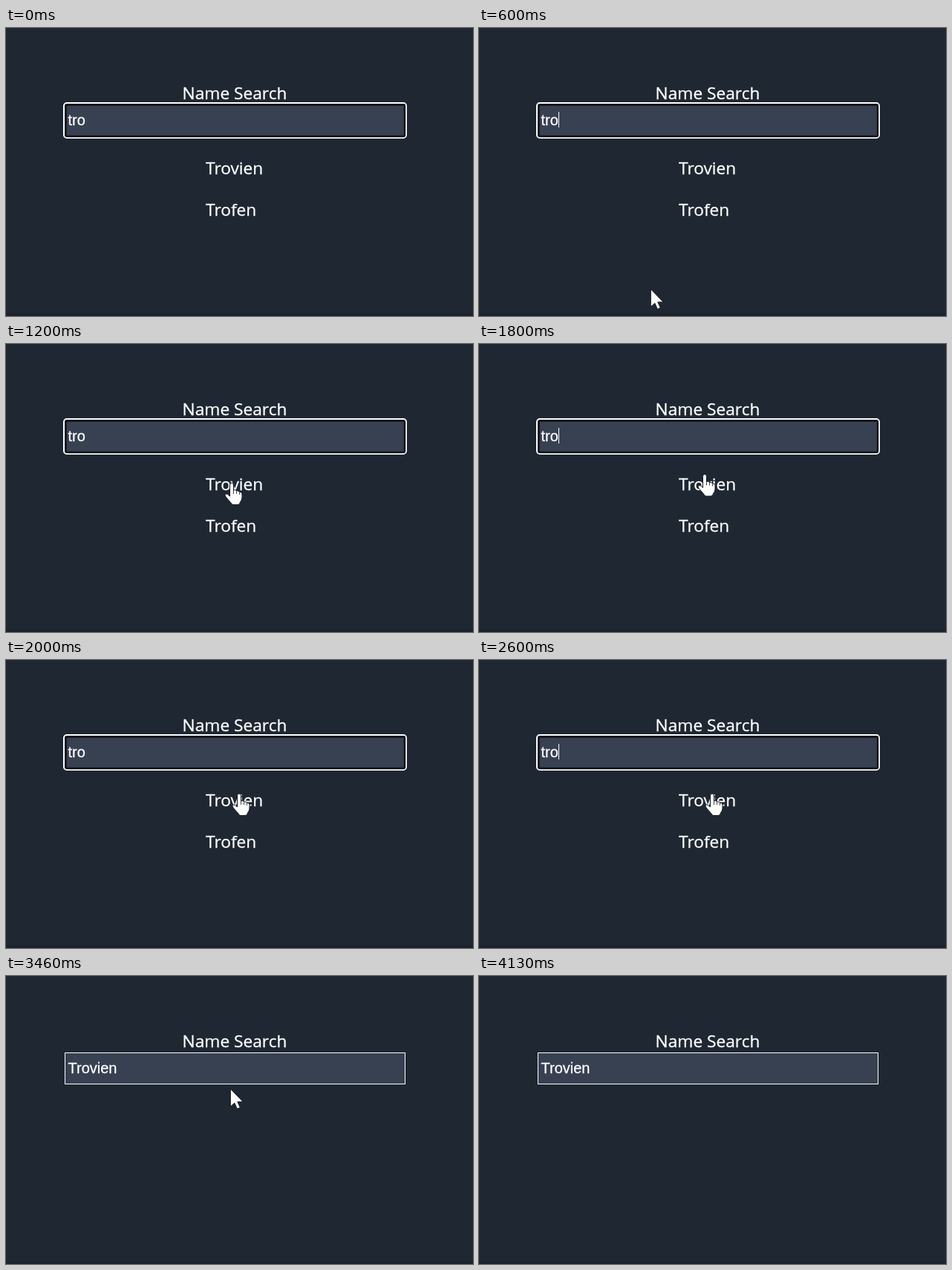
Write an HTML page that moves like this. It is 629 px wide and 388 px high and loops after 4.27 s.

```html
<!DOCTYPE html>
<html lang="en">
<head>
<meta charset="utf-8">
<title>Name Search</title>
<style>
  html, body { margin: 0; width: 100%; height: 100%; overflow: hidden; background: #1f2832; }
  svg { display: block; width: 629px; height: 388px; }
  text { font: 22.7px "Open Sans", "Noto Sans", sans-serif; fill: #fff; stroke: #fff; stroke-width: .3; }
  .typed { font: 20px "Liberation Sans", Arial, sans-serif; }
  .pointer { fill: #fff; stroke: #11161c; stroke-linejoin: round; }
</style>
</head>
<body>
<svg viewBox="0 0 629 388">
  <rect y="384" width="629" height="4" fill="#1b242d"/>
  <text x="237.6" y="96.4">Name Search</text>

  <g id="open">
    <rect x="78" y="101" width="461" height="47" rx="4" fill="#11161c" stroke="#fff" stroke-width="2"/>
    <rect x="80.5" y="103.5" width="456.5" height="42.5" rx="2" fill="#384152" stroke="#0d1116" stroke-width="2.5"/>
    <text class="typed" x="83.5" y="130.5">tro</text>
    <rect id="caret" x="107" y="113" width="1" height="21" fill="#fff"/>
    <text x="269" y="196.5">Trovien</text>
    <text x="269" y="252.5">Trofen</text>
  </g>

  <g id="chosen">
    <rect x="79.5" y="103.5" width="458" height="42" fill="#384152" stroke="#fff"/>
    <text class="typed" x="83.5" y="130.5">Trovien</text>
  </g>

  <path id="arrow" class="pointer" d="M-.7-1v24l5.500-5l3.600 8l4-1.700l-3.600-7.900h7.400Z"/>
  <g id="hand" class="pointer">
    <path d="M-2.5 3Q-2.5 0 0 0T2.5 3V10Q5 8.500 6.500 11Q9 10 10.500 12.500Q14 12 14 16V20
             Q14 23 11.500 26Q11 29.500 8 29.500H2Q0 29.500-1 27L-8 19Q-10 16-8 15Q-6 14-2.500 18Z"/>
    <path d="M2.500 10v5m4-3.500v3.500m4-2v3" fill="none" stroke-width=".8"/>
  </g>
</svg>
<script>
  const LOOP = 4270, STEP = 200 / 3, PICK = 2793;
  const INPUT_BOTTOM = 147, LIST_BOTTOM = 272;
  const get = id => document.getElementById(id);
  const [open, chosen, caret, arrow, hand] = ["open", "chosen", "caret", "arrow", "hand"].map(get);

  const ramp = (t, from, to) => Math.min(1, Math.max(0, (t - from) / (to - from)));
  const show = (el, on) => { el.style.display = on ? "" : "none"; };

  // the pointer rises to the first name, drifts over it, clicks and leaves into the input
  function pointerAt(t) {
    const rise = ramp(t, 400, 1200), settle = ramp(t, 1200, 1530);
    const drift = ramp(t, 1800, 2000), leave = ramp(t, 3190, 3600);
    const slip = t >= PICK ? 11 : 0;
    return [
      208 + 96 * rise + 10 * drift - slip,
      408 - 221 * rise - 11.5 * settle + 4.5 * drift - 40 * leave
    ];
  }

  function draw(time) {
    // the screen refreshes 15 times a second
    const t = Math.floor((time % LOOP + 7) / STEP) * STEP;
    const picked = t >= PICK;
    show(open, !picked);
    show(chosen, picked);
    show(caret, (t + 470) % 1000 < 460);

    const pos = pointerAt(t), y = pos[1];
    const overList = !picked && y < LIST_BOTTOM;
    show(hand, overList);
    show(arrow, !overList && y > INPUT_BOTTOM);
    (overList ? hand : arrow).setAttribute("transform", `translate(${pos})`);
  }

  let start;
  function tick(now) {
    start ??= now;
    draw(now - start);
    requestAnimationFrame(tick);
  }
  draw(0);
  requestAnimationFrame(tick);
</script>
</body>
</html>
```
